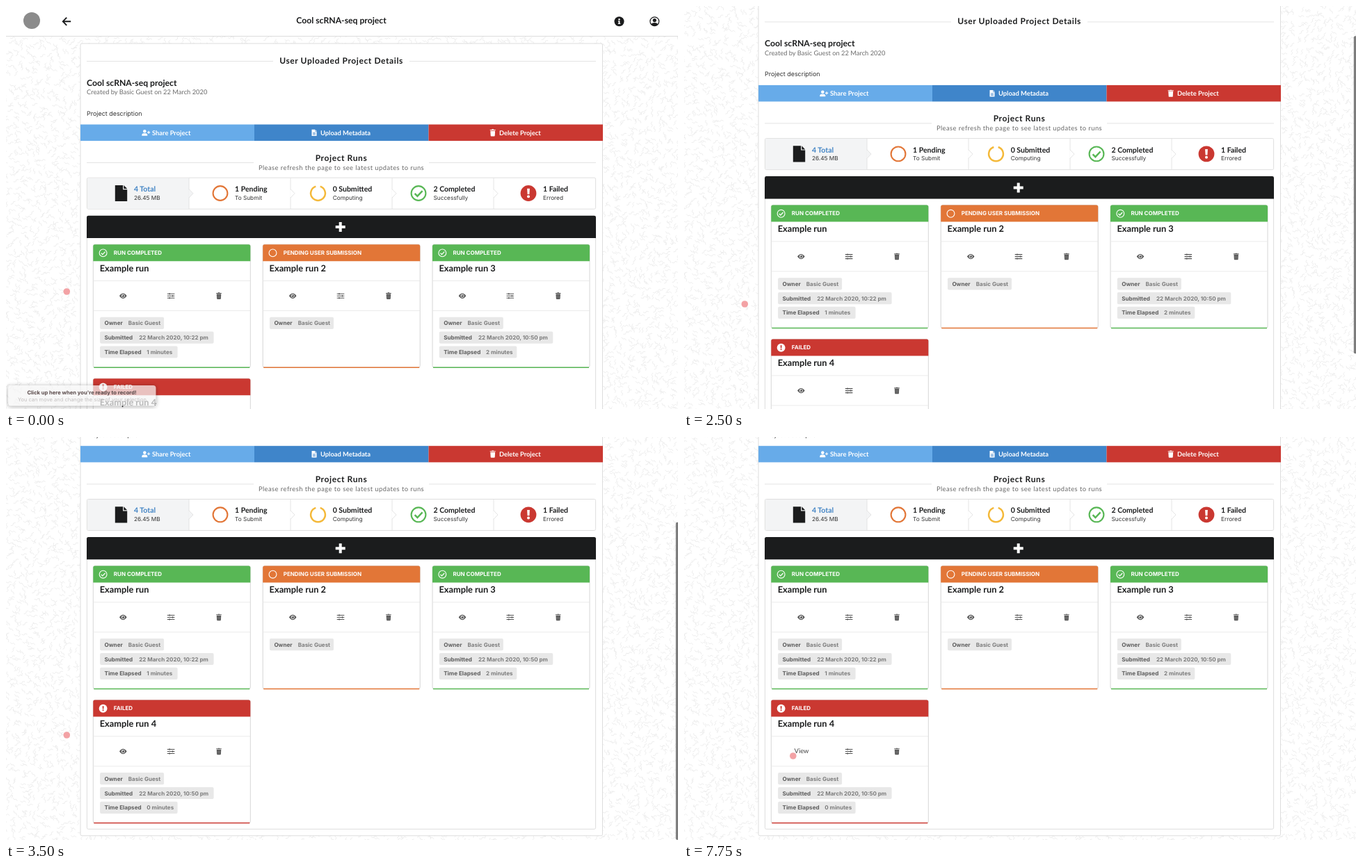
Animation, 966 px wide and 580 px high, one loop 8 s. Source, as an HTML page:

```html
<!DOCTYPE html>
<html lang="en">
<head>
<meta charset="utf-8">
<title>Project details</title>
<style>
  html, body { margin: 0; width: 100%; height: 100%; overflow: hidden; background: #fff; }
  svg { display: block; }
  text { font-family: Inter, "Noto Sans", sans-serif; text-rendering: geometricPrecision; white-space: pre; }
  .lato { font-family: Lato, "Open Sans", sans-serif; }
  .bold { font-weight: 700; }
  .mid { text-anchor: middle; }
</style>
</head>
<body>
<svg id="stage" width="966" height="580" viewBox="0 0 966 580"></svg>
<script>
const INK = '#1b1c1d', GREEN = '#58b755', ORANGE = '#e27637', RED = '#ca3831', YELLOW = '#f4b93a';
const OWNER = 'Basic Guest', PROJECT = 'Cool scRNA-seq project';

const text = (x, y, size, str, cls = '', fill = INK, extra = '') =>
  `<text x="${x}" y="${y}" font-size="${size}" class="${cls}" fill="${fill}" ${extra}>${str}</text>`;
const rect = (x, y, w, h, fill, extra = '') =>
  `<rect x="${x}" y="${y}" width="${w}" height="${h}" fill="${fill}" ${extra}/>`;
const line = (d, color = '#dedede', width = 0.8, extra = '') =>
  `<path d="${d}" fill="none" stroke="${color}" stroke-width="${width}" ${extra}/>`;

// Icons are drawn around 0,0 and take the current colour.
const stroke = 'fill="none" stroke="currentColor"';
const icons = {
  eye: `<path d="M-5.3 0Q-2.8-3.7 0-3.7T5.3 0Q2.8 3.7 0 3.7T-5.3 0Z"/>
        <circle r="2.2" fill="none" stroke="#fff" stroke-width=".9"/><circle cx="-.7" cy="-.7" r=".6" fill="#fff"/>`,
  sliders: `<path d="M-5.3-3H5.3M-5.3 0H5.3M-5.3 3H5.3M-2-4.2v2.4M2.5-1.2v2.4M-2 1.8v2.4" ${stroke} stroke-width="1.1"/>`,
  trash: `<path d="M-4.2-4.7H-1.6L-1.1-5.4H1.1L1.6-4.7H4.2V-3.5H-4.2ZM-3.6-2.9H3.6L3.2 4.3Q3.1 5.3 2.2 5.3H-2.2Q-3.1 5.3-3.2 4.3Z"/>
          <path d="M-1.7-1.5V4M0-1.5V4M1.7-1.5V4" stroke="#fff" stroke-opacity=".35" stroke-width=".6"/>`,
  file: '<path d="M-8.7-11.6H2.6V-5.3H8.7V11.6H-8.7ZM3.8-11.6L8.7-6.5H3.8Z"/>',
  sheet: '<path d="M-3.5-4.7H1V-2H3.5V4.7H-3.5ZM1.5-4.7L3.5-2.5H1.5Z"/><path d="M-2 0H2M-2 1.4H2M-2 2.8H2" stroke="#3f85ca" stroke-width=".7"/>',
  userPlus: `<circle cx="-1.8" cy="-2.2" r="2.4"/><path d="M-6 4.7V3.6Q-6 .9-3.4.9H-.2Q2.4.9 2.4 3.6V4.7Z"/>
             <path d="M4.3-2.7V1.7M2.1-.5H6.5" ${stroke} stroke-width="1.2"/>`,
  ring: `<circle r="10.4" ${stroke} stroke-width="2.1"/>`,
  notch: `<path d="M3.2-9.9A10.4 10.4 0 1 1-3.2-9.9" ${stroke} stroke-width="2.5"/>`,
  check: `<circle r="10.4" ${stroke} stroke-width="2.1"/><path d="M-5.4.4L-1.6 4.2L5.6-3.4" ${stroke} stroke-width="2.5"/>`,
  alert: '<circle r="11.4"/><path d="M-1.9-6.8H1.9L1.4 1.5H-1.4Z" fill="#fff"/><circle cy="4.8" r="2" fill="#fff"/>',
  alertInverse: `<circle r="11.4"/><path d="M-1.9-6.8H1.9L1.4 1.5H-1.4Z" fill="${RED}"/><circle cy="4.8" r="2" fill="${RED}"/>`,
  plus: `<path d="M0-7V7M-7 0H7" ${stroke} stroke-width="4"/>`,
  back: `<path d="M6.2 0H-5M.2-5.6L-5.2 0L.2 5.6" ${stroke} stroke-width="1.9"/>`,
  info: '<circle r="7"/><path d="M-1.6-1H.9V2.6H1.7V3.9H-1.7V2.6H-.9V.3H-1.6Z" fill="#fff"/><circle cy="-3" r="1.2" fill="#fff"/>',
  user: `<circle r="6.4" ${stroke} stroke-width="1.2"/><circle cy="-1.6" r="2.6"/><path d="M-4.8 4Q-3.6 1.7 0 1.7T4.8 4Q3 6.4 0 6.4T-4.8 4Z"/>`
};
const icon = (name, x, y, color, scale = 1, id = '') =>
  `<g ${id && `id="${id}"`} transform="translate(${x} ${y}) scale(${scale})" color="${color}" fill="${color}">${icons[name]}</g>`;

function squiggles() {
  let seed = 7, d = '';
  const rnd = () => (seed = seed * 16807 % 2147483647) / 2147483647;
  for (let y = 44; y < 745; y += 8) {
    for (let x = 0; x < 970; x += 9) {
      if (x > 114 && x < 848 && y > 62 && y < 722) continue;
      const a = rnd() * 6.28, dx = 4 * Math.cos(a), dy = 4 * Math.sin(a);
      const px = x + rnd() * 6, py = y + rnd() * 6;
      d += `M${px} ${py}q${dx - dy * .5} ${dy + dx * .5} ${dx} ${dy}t${dx} ${dy}`;
    }
  }
  return line(d, '#ebebeb', 0.9);
}

function pageHeader() {
  return rect(0, 0, 966, 43.5, '#fff') + line('M0 43.5H966', '#dcdcdc', 1) +
    '<circle cx="37" cy="21" r="12" fill="#8b8b8b"/>' +
    icon('back', 87, 22.2, INK) + icon('info', 881.5, 22.2, INK) + icon('user', 932.3, 22.2, INK) +
    text(482, 24.6, 12.2, PROJECT, 'lato bold mid');
}

function details() {
  const button = (x, w, color, name, iconX, label, labelX, scale) =>
    rect(x, 170.5, w, 23.6, color) + icon(name, iconX, 182.4, '#fff', scale) +
    text(labelX, 185.7, 9.33, label, 'lato bold', '#fff');
  return rect(107, 54, 750.5, 677.5, '#fff', 'rx="2" stroke="#dadada" stroke-width=".9"') +
    line('M116 79.5H384M580 79.5H848M116 225.5H356M608 225.5H848') +
    text(482, 83, 12, 'User Uploaded Project Details', 'lato bold mid', INK, 'letter-spacing=".6"') +
    text(116, 115, 12.2, PROJECT, 'lato bold') +
    text(116, 127.4, 9.33, `Created by ${OWNER} on 22 March 2020`, 'lato', '#6b6b6b') +
    text(116, 157.6, 8.95, 'Project description', '', '#333') +
    button(107, 250, '#67abe9', 'userPlus', 201, 'Share Project', 210, 0.95) +
    button(357, 250.5, '#3f85ca', 'sheet', 443, 'Upload Metadata', 452, 1) +
    button(607.5, 250.5, RED, 'trash', 699.7, 'Delete Project', 709, 0.95) +
    text(482, 223, 12, 'Project Runs', 'lato bold mid', INK, 'letter-spacing=".6"') +
    text(482, 235.6, 9.33, 'Please refresh the page to see latest updates to runs', 'lato mid', '#666', 'letter-spacing=".467"');
}

function summary() {
  const steps = [
    ['file', 165.5, INK, 184, '4 Total', '26.45 MB', '#4183c4'],
    ['ring', 308, ORANGE, 329, '1 Pending', 'To Submit'],
    ['notch', 448.5, YELLOW, 469.7, '0 Submitted', 'Computing'],
    ['check', 593, GREEN, 614.5, '2 Completed', 'Successfully'],
    ['alert', 751, RED, 772, '1 Failed', 'Errored']
  ];
  let out = rect(116.4, 247.2, 731.2, 45, '#fff', 'rx="2" stroke="#dcdcdc" stroke-width=".9"') +
    rect(117, 247.7, 146, 44, '#f3f4f5');
  for (const x of [263, 409, 555, 701])
    out += line(`M${x} 247.5V292`) +
      `<path d="M${x - .6} 263.5L${x + 6} 269.7L${x - .6} 276Z" fill="${x < 300 ? '#f3f4f5' : '#fff'}"/>` +
      line(`M${x} 263.5L${x + 6} 269.7L${x} 276`);
  for (const [name, iconX, color, x, title, note, ink] of steps)
    out += icon(name, iconX, 269.5, color) + text(x, 267.2, 10.5, title, 'lato bold', ink) +
      text(x, 278.8, 8.25, note, '', '#333');
  return out;
}

function card(x, y, color, name, status, title, rows, eyeId) {
  const [label, label2, label3] = ['Owner', 'Submitted', 'Time Elapsed'];
  const tags = [[label, 92, 40.5], [label2, 163.5, 56], [label3, 111.5, 67]];
  let out = rect(0, 0, 226, 177, '#fff', 'rx="2.5" stroke="#d6d6d6" stroke-width="1"') +
    line('M1 177H225', color, 1.5) +
    `<path d="M0 24V2.5Q0 0 2.5 0H223.5Q226 0 226 2.5V24Z" fill="${color}"/>` +
    icon(name, 14.3, 12.2, '#fff', 0.52) +
    text(29.5, 14.7, 8, status, 'bold', '#fff') +
    text(9.4, 38.8, 12.8, title, 'lato bold') +
    line('M0 52.3H226M0 95.3H226', '#e6e6e6') +
    icon('eye', 43, 74, '#555', 1, eyeId) + icon('sliders', 111.8, 74, '#555') + icon('trash', 180.7, 74, '#555', 0.9);
  rows.forEach((value, i) => {
    const [tag, w, valueX] = tags[i], top = 104.6 + i * 20.8;
    out += rect(9.8, top, w, 17.2, '#e8e8e8', 'rx="2"') +
      text(16.2, top + 11.6, 8.1, tag, 'bold', '#5d5d5d') +
      text(10 + valueX, top + 11.6, 8, value, 'bold', '#7c7c7c');
  });
  return `<g transform="translate(${x} ${y})">${out}</g>`;
}

function runs() {
  return rect(116.4, 320, 731.2, 402, '#fff', 'rx="2" stroke="#dadada" stroke-width=".9"') +
    `<path d="M116 334V304Q116 301.7 118.500 301.700H845.5Q848 301.7 848 304V334Z" fill="${INK}"/>` +
    icon('plus', 480.7, 318, '#fff') +
    card(125.3, 343.2, GREEN, 'check', 'RUN COMPLETED', 'Example run', [OWNER, '22 March 2020, 10:22 pm', '1 minutes']) +
    card(369.2, 343.2, ORANGE, 'ring', 'PENDING USER SUBMISSION', 'Example run 2', [OWNER]) +
    card(613, 343.2, GREEN, 'check', 'RUN COMPLETED', 'Example run 3', [OWNER, '22 March 2020, 10:50 pm', '2 minutes']) +
    card(125.3, 536.2, RED, 'alertInverse', 'FAILED', 'Example run 4', [OWNER, '22 March 2020, 10:50 pm', '0 minutes'], 'eye') +
    text(158.6, 613, 9.4, 'View', 'lato', '#444', 'id="view"');
}

const hint = '<g id="hint">' +
  rect(3, 546, 212.5, 29.5, '#f6f6f6', 'rx="4" opacity=".72" style="filter:drop-shadow(0 1px 3px #0007)"') +
  text(109, 559, 7.6, "Click up here when you're ready to record!", 'bold mid', '#5a4a4a') +
  text(110.5, 569, 7.5, 'You can move and change the size of your selection.', 'mid', '#c4c0c0') + '</g>';

const stage = document.getElementById('stage');
stage.innerHTML = `<g id="page">${squiggles()}${pageHeader()}${details()}${summary()}${runs()}</g>` + hint +
  rect(962.8, 0, 5, 457, '#7d7d7d', 'id="thumb" rx="2"') +
  '<circle id="dot" r="4.8" fill="#f29a9d" fill-opacity=".92"/>';
const part = id => document.getElementById(id);
const [page, hintBox, thumb, dot, eye, view] = ['page', 'hint', 'thumb', 'dot', 'eye', 'view'].map(part);

const scrollKeys = [[2000, 0], [2250, 23.2], [2750, 90], [3000, 125.2], [3250, 146], [3500, 157.7]];
const dotKeys = [[500, 87.3, 411], [1500, 87.3, 429], [3750, 87.3, 429], [5000, 107, 443], [5250, 152.8, 458.3], [6000, 156.8, 459]];

function track(keys, t) {
  const i = keys.findIndex(key => key[0] > t);
  if (i < 0) return keys[keys.length - 1].slice(1);
  if (i === 0) return keys[0].slice(1);
  const a = keys[i - 1], b = keys[i], k = (t - a[0]) / (b[0] - a[0]);
  return a.slice(1).map((v, j) => v + (b[j + 1] - v) * k);
}
const show = (node, on) => node.setAttribute('visibility', on ? 'visible' : 'hidden');

function render(now) {
  const t = Math.floor(now % 8000 / 250) * 250;
  const [scroll] = track(scrollKeys, t), [x, y] = track(dotKeys, t);
  const hover = t >= 5250;
  page.setAttribute('transform', `translate(0 ${-scroll})`);
  thumb.setAttribute('y', scroll * 0.786 - 1.3);
  dot.setAttribute('cx', x);
  dot.setAttribute('cy', y);
  show(hintBox, t < 250);
  show(thumb, t >= 2250 && t < 6500);
  show(eye, !hover);
  show(view, hover);
}
const start = performance.now();
function frame() {
  render(performance.now() - start);
  requestAnimationFrame(frame);
}
frame();
</script>
</body>
</html>
```
